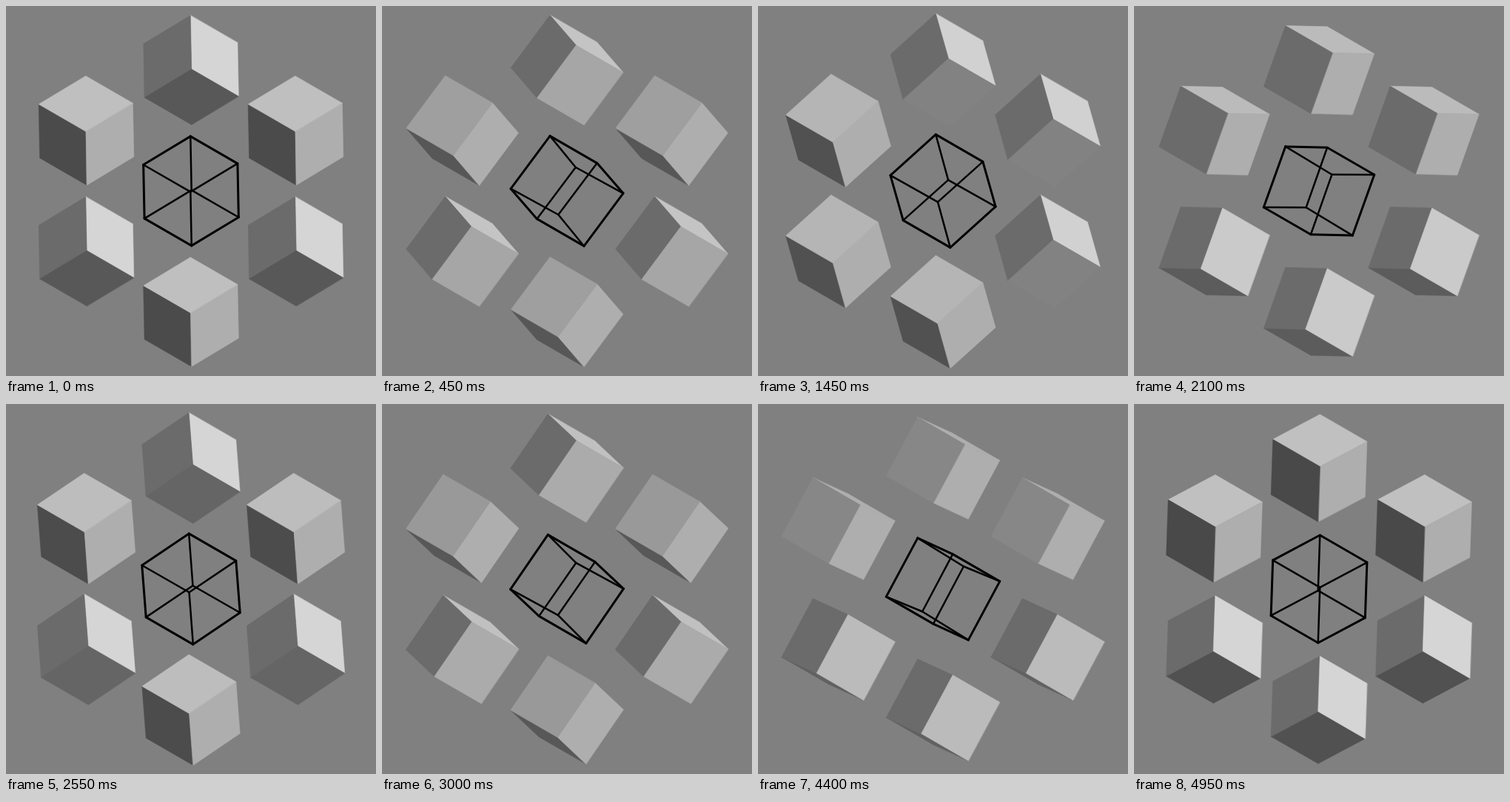
Recreate the animation shown at these times as an HTML page with a canvas. Size 500x500 px, loop 5 s.

```html
<!DOCTYPE html>
<html lang="en">
<head>
<meta charset="utf-8">
<title>Ambiguous cubes</title>
<style>
  html, body { margin: 0; width: 100%; height: 100%; overflow: hidden; background: #808080; }
  canvas { display: block; width: 500px; height: 500px; }
</style>
</head>
<body>
<canvas id="stage" width="500" height="500"></canvas>
<script>
const ctx = document.getElementById('stage').getContext('2d');
const LOOP = 5000, STEP = 50, QUARTER = 1250, START_ANGLE = 88.7;
const SIDE = 90, RING = 163.4, MID = 250, INSET = 0.95;
const R2 = Math.SQRT1_2, R6 = 1 / Math.sqrt(6), R3 = 1 / Math.sqrt(3);
const RAD = Math.PI / 180;

// Isometric cube axes; the cube turns about AXIS.
const DOWN = [0, 2 * R6, -R3], AXIS = [R2, R6, R3], LEFT = [-R2, R6, R3];

// Cubes seen from below, clockwise from the top, for each phase.
const FLIPPED = [[0, 2, 4], [0, 1, 2], [2, 3, 4]];

// Lighting of each reading of a cube: cap is the grey of the face across AXIS.
const ABOVE = { cap: 174, peak: 100, base: 70, gain: 123, power: 1 };
const BELOW = { cap: 107, peak: 0, base: 80, gain: 133, power: 0.75 };
const FILL = 25;

const mix = (u, p, v, q) => u.map((n, i) => n * p + v[i] * q);

function axesAt(angle) {
  const c = Math.cos(angle * RAD), s = Math.sin(angle * RAD);
  return [mix(DOWN, c, LEFT, s), AXIS, mix(LEFT, c, DOWN, -s)];
}

function corner(axes, signs, cx, cy, scale = 1) {
  const at = i => axes.reduce((sum, v, k) => sum + v[i] * signs[k], 0) * scale * SIDE / 2;
  return [cx + at(0), cy + at(1)];
}

// The four sign triples around axis k, all with the given sign on k.
function around(k, sign) {
  return [[1, 1], [1, -1], [-1, -1], [-1, 1]].map(([p, q]) => {
    const signs = [];
    signs[k] = sign;
    signs[(k + 1) % 3] = p;
    signs[(k + 2) % 3] = q;
    return signs;
  });
}

function shade(light, turn) {
  const d = Math.cos((turn - light.peak) * RAD);
  return light.base + (d > 0 ? light.gain * d ** light.power : -FILL * d);
}

function drawSolid(axes, angle, cx, cy, below) {
  const light = below ? BELOW : ABOVE, facing = below ? -1 : 1;
  axes.forEach((v, k) => {
    const sign = v[2] > 0 ? facing : -facing;
    const turn = k === 0 ? angle - 90 * sign * facing : angle;
    const grey = Math.round(k === 1 ? light.cap : shade(light, turn));
    ctx.beginPath();
    around(k, sign).forEach(signs => ctx.lineTo(...corner(axes, signs, cx, cy)));
    ctx.closePath();
    ctx.fillStyle = ctx.strokeStyle = `rgb(${grey},${grey},${grey})`;
    ctx.lineWidth = 0.5;
    ctx.fill();
    ctx.stroke();
  });
}

function drawWire(axes) {
  const isInner = signs =>
    Math.abs(signs.reduce((sum, n, k) => sum + n * Math.sign(axes[k][2]), 0)) === 3;
  const place = signs => corner(axes, signs, MID, MID, isInner(signs) ? INSET : 1);
  ctx.strokeStyle = '#000';
  ctx.lineCap = 'round';
  for (let k = 0; k < 3; k++) {
    const ends = around(k, 1);
    around(k, -1).forEach((from, i) => {
      const to = ends[i];
      ctx.lineWidth = isInner(from) || isInner(to) ? 2.5 : 3;
      ctx.beginPath();
      ctx.moveTo(...place(from));
      ctx.lineTo(...place(to));
      ctx.stroke();
    });
  }
}

function draw(t) {
  const angle = START_ANGLE - (t % QUARTER) * 90 / QUARTER;
  const axes = axesAt(angle);
  const flipped = FLIPPED[Math.floor(t * 6 / LOOP) % 3];
  ctx.fillStyle = '#808080';
  ctx.fillRect(0, 0, 500, 500);
  for (let i = 0; i < 6; i++) {
    const a = i * Math.PI / 3;
    drawSolid(axes, angle, MID + RING * Math.sin(a), MID - RING * Math.cos(a), flipped.includes(i));
  }
  drawWire(axes);
}

const start = performance.now();
function tick() {
  const t = (performance.now() - start) % LOOP;
  draw(Math.floor(t / STEP) * STEP);
  requestAnimationFrame(tick);
}
tick();
</script>
</body>
</html>
```
